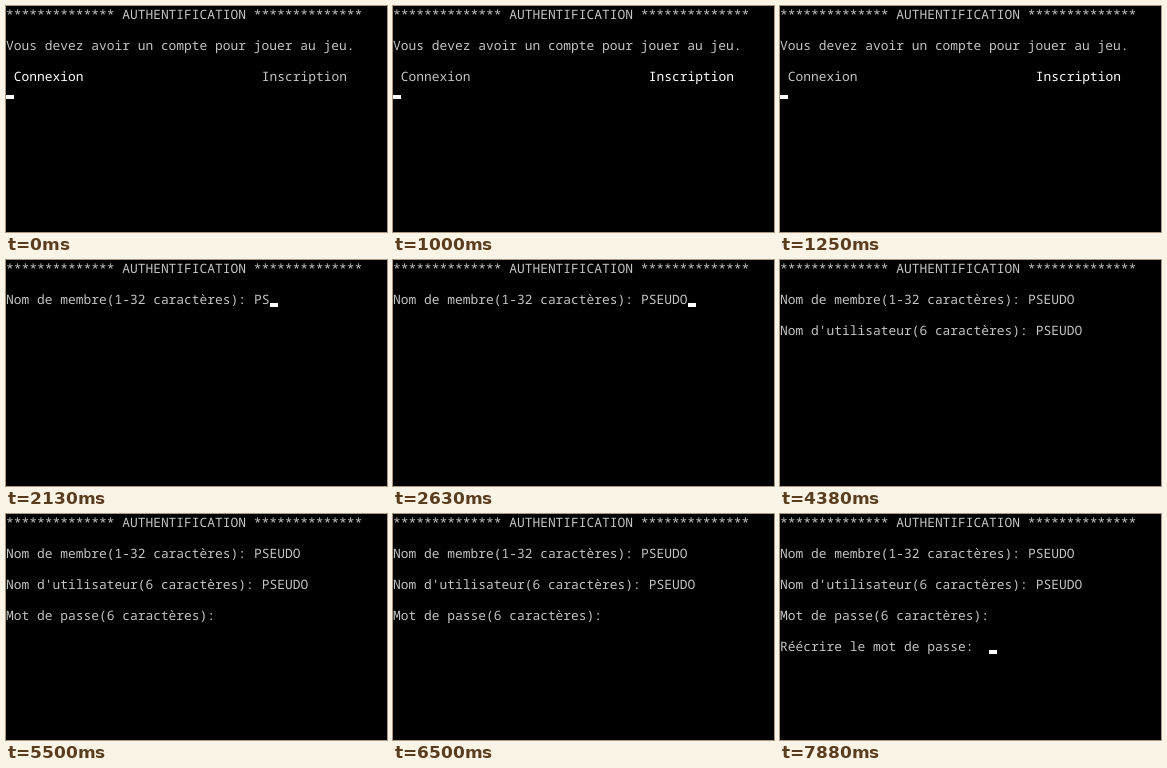
An HTML page for the animation above (8000 ms loop, 381 px wide and 226 px high).

```html
<!DOCTYPE html>
<html lang="fr">
<head>
<meta charset="utf-8">
<title>Authentification</title>
<style>
  html, body { margin: 0; width: 100%; height: 100%; overflow: hidden; background: #000; }
  svg { display: block; width: 381px; height: 226px; background: #000; }
  text {
    font: 12.917px "Noto Sans Mono", "DejaVu Sans Mono", monospace;
    fill: #c4c4c4;
    white-space: pre;
    text-rendering: geometricPrecision;
  }
  text.on { fill: #fff; }
  rect { fill: #fff; }
</style>
</head>
<body>
<svg viewBox="0 0 381 226"></svg>
<script>
const NS = 'http://www.w3.org/2000/svg';
const svg = document.querySelector('svg');
const CELL_W = 7.75, CELL_H = 15.5, LOOP = 8000;
const PLAYER = 'PSEUDO';

const add = (tag, attrs, text = '') => {
  const el = document.createElementNS(NS, tag);
  for (const key in attrs) el.setAttribute(key, attrs[key]);
  el.textContent = text;
  return svg.appendChild(el);
};
const write = (row, col, text) =>
  add('text', { x: col * CELL_W, y: row * CELL_H + 12.5 }, text);
const show = (el, on) => { el.style.display = on ? '' : 'none'; };

const stars = '*'.repeat(14);
write(0, 0, `${stars} AUTHENTIFICATION ${stars}`);

const intro = write(2, 0, 'Vous devez avoir un compte pour jouer au jeu.');
const options = [write(4, 1, 'Connexion'), write(4, 33, 'Inscription')];

// Visible answers echo the typed letters, hidden ones only move the cursor.
const fields = [
  { label: 'Nom de membre(1-32 caractères): ', echo: true },
  { label: "Nom d'utilisateur(6 caractères): ", echo: true },
  { label: 'Mot de passe(6 caractères): ', echo: false },
  { label: 'Réécrire le mot de passe: ', echo: false }
];
fields.forEach((f, i) => {
  f.row = 2 + 2 * i;
  f.prompt = write(f.row, 0, f.label);
  f.answer = write(f.row, f.label.length, '');
});
const cursor = add('rect', { width: 8, height: 4 });

// [start ms, field (-1 = menu), selected option or typed letters, cursor lit]
const steps = [
  [0, -1, 0, 1], [130, -1, 1, 1],
  [1380, 0, 0, 1], [1880, 0, 0, 0], [2000, 0, 1, 1], [2130, 0, 2, 1],
  [2250, 0, 3, 1], [2380, 0, 4, 1], [2500, 0, 5, 1], [2630, 0, 6, 1],
  [2750, 1, 0, 1], [3250, 1, 0, 0], [3500, 1, 1, 1], [3750, 1, 2, 1],
  [3880, 1, 3, 1], [4000, 1, 4, 1], [4130, 1, 5, 1], [4250, 1, 6, 1], [4380, 1, 6, 0],
  [4630, 2, 0, 1], [5250, 2, 0, 0], [5750, 2, 1, 1], [6000, 2, 2, 1],
  [6130, 2, 3, 1], [6250, 2, 4, 1], [6380, 2, 5, 1], [6500, 2, 5, 0],
  [6750, 3, 0, 1], [7630, 3, 0, 0], [7880, 3, 1, 1]
];

function render([, field, count, lit]) {
  const menu = field < 0;
  show(intro, menu);
  options.forEach((el, i) => {
    show(el, menu);
    el.classList.toggle('on', menu && i === count);
  });
  fields.forEach((f, i) => {
    const typed = i < field ? PLAYER.length : i === field ? count : 0;
    show(f.prompt, i <= field);
    f.answer.textContent = f.echo ? PLAYER.slice(0, typed) : '';
  });
  const row = menu ? 5 : fields[field].row;
  const col = menu ? 0 : fields[field].label.length + count;
  cursor.setAttribute('x', Math.round(col * CELL_W));
  cursor.setAttribute('y', Math.round(row * CELL_H + 11.7));
  show(cursor, lit);
}

const start = performance.now();
let current;
function tick() {
  const t = (performance.now() - start) % LOOP;
  const step = steps.findLast(s => s[0] <= t) || steps[0];
  if (step !== current) render(current = step);
  requestAnimationFrame(tick);
}
tick();
</script>
</body>
</html>
```
